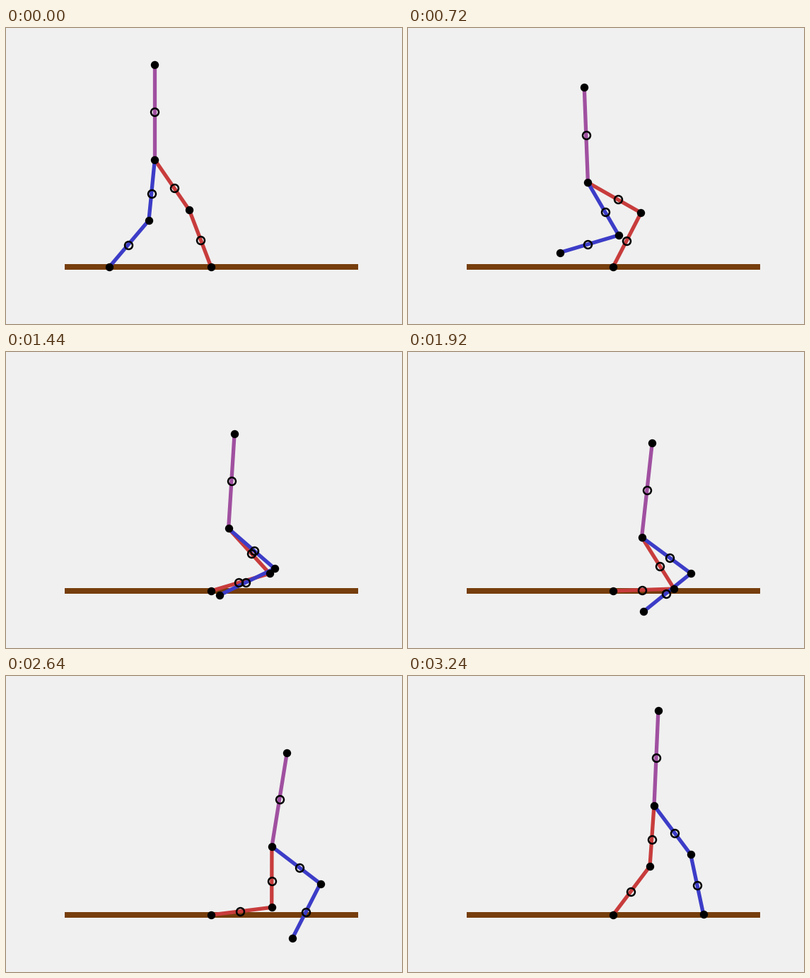
Recreate the animation shown at these times as a matplotlib script. Size 560 by 420 pixels, loop 3360 ms.

```python
import numpy as np
import matplotlib.pyplot as plt
from matplotlib.animation import FuncAnimation

W, H, DPI = 560, 420, 100
PX = 72 / DPI                      # points per pixel
FRAMES, STEP = 28, 120
LEG, TORSO = 86.4, 135.0
FOOT = np.array([290.0, 339.0])

# Link angles from the vertical, in degrees, at a few key ticks.
TICKS = np.array([1, 4, 6, 8, 11, 12, 16, 19, 21, 24, 26, 27])
ANGLES = np.array([
    [-20.9, 8.7, 27.2, 58.2, 67.7, 73.4, 88, 93, 86.2, 74.2, 58, 37],           # stance shin
    [-34.4, -54, -60.3, -57.7, -50, -42.3, -32, -3.8, -1.3, 2.8, 3.9, 4],       # stance thigh
    [0, -4.5, -2.2, 0.9, 2.9, 3.6, 6.3, 8, 8.8, 8.7, 5, 2.5],                   # torso
    [-5.6, 20.6, 30.2, 35.4, 44, 48.9, 53.5, 61.7, 55, 47.6, 39.6, 36.7],       # swing thigh
    [-40.2, -66.8, -73.5, -75.5, -69.5, -64.1, -51, -34.9, -31, -16.8, -8, 12]  # swing shin
])
SLOPES = np.gradient(ANGLES, TICKS, axis=1)


def pose(tick):
    """Smooth cubic blend between the key angles, in radians."""
    t = max(tick, 1)
    k = min(np.searchsorted(TICKS, t, side="right") - 1, len(TICKS) - 2)
    h = TICKS[k + 1] - TICKS[k]
    s = (t - TICKS[k]) / h
    a = ((1 + 2 * s) * (1 - s) ** 2 * ANGLES[:, k]
         + s * s * (3 - 2 * s) * ANGLES[:, k + 1]
         + h * s * (1 - s) ** 2 * SLOPES[:, k]
         - h * s * s * (1 - s) * SLOPES[:, k + 1])
    return np.radians(a)


def up(a, length):
    return length * np.array([np.sin(a), -np.cos(a)])


def down(a, length):
    return length * np.array([np.sin(a), np.cos(a)])


def joints(tick):
    q = pose(tick)
    knee = FOOT + up(q[0], LEG)
    hip = knee + up(q[1], LEG)
    head = hip + up(q[2], TORSO)
    knee2 = hip + down(q[3], LEG)
    foot2 = knee2 + down(q[4], LEG)
    return knee, hip, head, knee2, foot2


def rgb(*c):
    return tuple(v / 255 for v in c)


fig = plt.figure(figsize=(W / DPI, H / DPI), dpi=DPI, facecolor=rgb(240, 240, 240))
ax = fig.add_axes([0, 0, 1, 1])
ax.set_xlim(0, W)
ax.set_ylim(H, 0)
ax.axis("off")


def link(color, width=5.3):
    return ax.plot([], [], color=color, lw=width * PX, solid_capstyle="butt",
                   solid_joinstyle="round")[0]


ground = link(rgb(118, 62, 12), 8)
ground.set_data([82.5, 497.5], [339, 339])
stance = link(rgb(200, 60, 60))
torso = link(rgb(160, 80, 160))
swing = link(rgb(60, 60, 200))
dots, = ax.plot([], [], "o", color="black", ms=11.4 * PX, mew=0)
rings, = ax.plot([], [], "o", mfc="none", mec="black", ms=10.9 * PX, mew=2.5 * PX)


def place(line, *points):
    line.set_data(*np.array(points).T)


def draw(tick):
    knee, hip, head, knee2, foot2 = joints(tick)
    place(stance, FOOT, knee, hip)
    place(torso, hip, head)
    place(swing, hip, knee2, foot2)
    place(dots, FOOT, knee, hip, head, knee2, foot2)

    def mix(a, b, f):
        return a + f * (b - a)

    place(rings,
          mix(knee, FOOT, 0.525), mix(hip, knee, 0.5625), mix(hip, head, 0.5),
          mix(hip, knee2, 0.5625), mix(knee2, foot2, 0.525))
    return stance, torso, swing, dots, rings


anim = FuncAnimation(fig, draw, frames=FRAMES, interval=STEP,
                     init_func=lambda: draw(0), repeat=True, repeat_delay=0)
plt.show()
```
